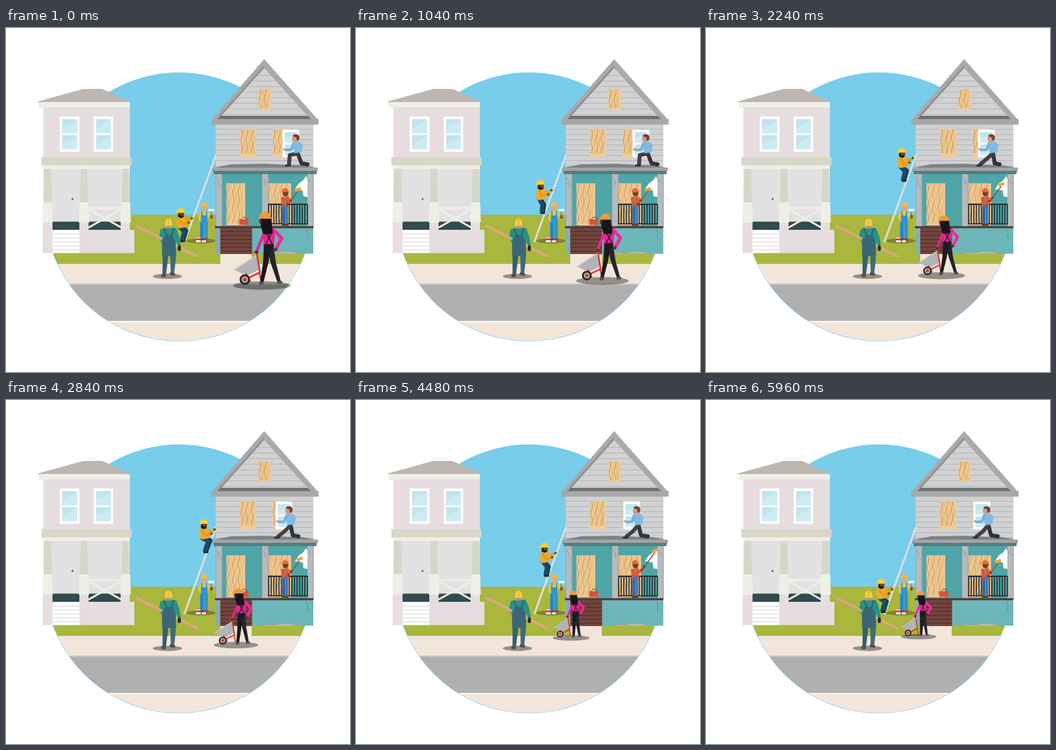
Animation, 525 px wide and 525 px high, one loop 6000 ms. Source, as an HTML page:

```html
<!DOCTYPE html>
<html lang="en">
<head>
<meta charset="utf-8">
<title>House repairs</title>
<style>
html, body { margin: 0; width: 100%; height: 100%; overflow: hidden; background: #fff; }
svg { display: block; width: 100vw; height: 100vh; }
</style>
</head>
<body>
<svg viewBox="0 0 525 525">
  <defs>
    <clipPath id="disc"><circle cx="264" cy="273" r="204.7"/></clipPath>
    <clipPath id="gable"><path d="M394 62L460 134H328Z"/></clipPath>
  </defs>
  <g id="back"></g><g id="moving"></g><g id="front"></g>
</svg>
<script>
const LOOP = 6000, STEP = 40;
const rect = (x, y, w, h, fill) => `<rect x="${x}" y="${y}" width="${w}" height="${h}" fill="${fill}"/>`;
const poly = (points, fill) => `<polygon points="${points}" fill="${fill}"/>`;
const oval = (x, y, rx, ry, fill) => `<ellipse cx="${x}" cy="${y}" rx="${rx}" ry="${ry}" fill="${fill}"/>`;
const shadow = (x, y, rx, ry) => oval(x, y, rx, ry, 'rgba(0,0,0,.38)');
const line = (points, color, w, cap = 'round') =>
  `<polyline points="${points}" fill="none" stroke="${color}" stroke-width="${w}" stroke-linecap="${cap}" stroke-linejoin="round"/>`;
const group = (transform, body) => `<g transform="${transform}">${body}</g>`;
const repeat = (n, draw) => Array.from({ length: n }, (_, i) => draw(i)).join('');
const lerp = (a, b, k) => a + (b - a) * k;
const ramp = (t, from, to) => Math.min(1, Math.max(0, (t - from) / (to - from)));

// Linear interpolation through [time, value] pairs
function track(t, keys) {
  const i = Math.max(1, keys.findIndex(k => k[0] >= t));
  const [a, b] = [keys[i - 1], keys[i]];
  return lerp(a[1], b[1], ramp(t, a[0], b[0]));
}

function helmet(x, y, r, color) {
  return `<path d="M${x - r} ${y}a${r} ${r * 1.05} 0 0 1 ${2 * r} 0z" fill="${color}"/>` +
    rect(x - r - .5, y - 1, 2 * r + 1, 2, color);
}

// Trouser leg that narrows from hip to ankle
function taperedLeg(hipX, hipY, kneeX, kneeY, footX, footY, color) {
  return poly(`${hipX - 5},${hipY} ${hipX + 5},${hipY} ${kneeX + 4},${kneeY} ${footX + 2.7},${footY} ` +
    `${footX - 2.7},${footY} ${kneeX - 4},${kneeY}`, color);
}

function wood(x, y, w, h) {
  const n = Math.floor(w / 3);
  return rect(x, y, w, h, '#f0cb97') + repeat(n, i => {
    const gx = x + 2 + i * (w - 3) / n;
    const pts = repeat(Math.floor(h / 4), j =>
      `${(gx + Math.sin(j * 1.1 + i * 2.3) * 1.1).toFixed(1)},${y + 1 + j * 4} `);
    return line(pts, i % 3 ? '#dfae6c' : '#c98f4b', 0.9);
  });
}

function sashWindow(x, y, w, h) {
  const pw = w - 7, ph = (h - 11) / 2;
  const pane = py => rect(x + 3.5, py, pw, ph, '#bfe5ef') +
    poly(`${x + 3.5},${py + ph} ${x + 3.5},${py + ph * .65} ${x + 3.5 + pw},${py + 2} ${x + 3.5 + pw},${py + ph}`, '#cdebf2');
  return rect(x, y, w, h, '#fff') + pane(y + 4) + pane(y + 7 + ph);
}

function ground() {
  return oval(264, 273, 205.3, 205.3, '#78cdea') + `<g clip-path="url(#disc)">` +
    rect(50, 285, 430, 76, '#a9b73d') +
    rect(50, 360, 430, 30, '#f2e6db') + rect(327, 344, 48, 18, '#f2e6db') +
    rect(50, 390, 430, 2, '#cdc6c0') + rect(50, 392, 430, 56, '#b0b0b0') +
    rect(50, 447, 430, 2, '#fff') + rect(50, 449, 430, 32, '#f2e6db') + '</g>';
}

function leftHouse() {
  const wall = '#e6dddf', trim = '#efefe8', stone = '#d8d7c7';
  const column = x => poly(`${x + 1},215 ${x + 11},215 ${x + 12},266 ${x},266`, stone) +
    poly(`${x - 1},266 ${x + 13},266 ${x + 14},297 ${x - 2},297`, trim);
  return poly('49,112 118,93 147,93 189,112 189,114 49,114', '#beb6b0') +
    rect(50, 113, 139, 9, trim) + rect(57, 121, 132, 77, wall) +
    sashWindow(82, 135, 30, 54) + sashWindow(134, 135, 29.5, 54) +
    rect(57, 210, 132, 98, '#e3e2e2') +
    rect(54, 197, 137.5, 13, stone) + rect(57, 209.5, 132, 6, trim) +
    line('70,216 70,296', '#d9d9d7', 1) + `<circle cx="101.5" cy="261" r="1.7" fill="#777"/>` +
    rect(70, 295.5, 105, 13, '#314b4e') + rect(112, 295, 14, 13, wall) +
    column(57.5) + column(113) + column(176.5) +
    rect(126, 273, 50, 3.5, trim) + line('127,277 175,304', trim, 3) + line('175,277 127,304', trim, 3) +
    rect(56, 297, 15, 46.5, wall) + rect(112, 308, 84, 35.5, wall) +
    rect(71, 308, 41, 35.5, '#fff') + repeat(5, i => rect(71, 314 + i * 6, 41, .8, '#cfcfcf'));
}

function rightHouse() {
  const siding = '#b4b5b7', grey = '#b7babc', teal = '#50a5a7', crack = '#85898c';
  return poly('394,47.5 477,141 313,141', '#a9aaac') + poly('394,57 394,62 328,135 324,135', '#8f9092') +
    poly('394,61 461,135 328,135', '#d1d2d3') +
    `<g clip-path="url(#gable)">${repeat(8, i => rect(325, 72 + i * 8.5, 140, 1, siding))}</g>` +
    poly('328,134 460,134 467,140 321,140', '#6f7072') +
    wood(385.5, 93, 18.5, 32) +
    rect(320, 147, 149, 67, '#d0d1d2') + repeat(8, i => rect(320, 154 + i * 8, 149, 1, siding)) +
    rect(313, 139, 164, 8.5, '#a7a8aa') +
    wood(357.5, 154, 24.5, 43) + wood(407, 154, 25, 43) +
    rect(320, 222, 149, 84, teal) +
    poly('315,215 344,208 395,207 450,210 475,215 475,219 315,219', '#85888c') +
    rect(316, 213, 160, 5, '#a2a4a7') + poly('344,208 450,209 472,213 318,213', '#7d8084') +
    rect(317, 218, 157, 5, '#527e82') +
    wood(336.5, 237, 28.5, 64) + wood(400, 237, 35, 64) +
    poly('458,226 461,233 461,258 454,257 453,248 441,246 447,237 453,233', '#fff') +
    [320.5, 391, 460].map(x => rect(x, 223, 9.5, 81, grey) + rect(x + 8, 223, 1.5, 81, '#a3a7a9')).join('') +
    line('321,229 325,234 323,238 328,243', crack, .8) + line('461,231 465,236 468,237', crack, .8) +
    line('392,229 396,234 395,240', crack, .8) +
    rect(400, 268, 60, 2, '#222a2d') + rect(400, 298, 60, 1.5, '#222a2d') +
    repeat(16, i => rect(400 + i * 3.95, 269, 1.6, 31, '#222a2d')) +
    rect(356, 292, 14, 8.5, '#d6523d') + line('359,292 361,289 367,289 368,292', '#9b3c2f', 1) +
    rect(375, 305, 94, 39.5, '#6cb6b9') + rect(320, 305, 8, 40, '#85afb3') +
    line('458,307 461,314 459,319 464,322', '#5d8f94', 1) +
    poly('392,344.5 398,342 412,343 421,340.5 437,341 447,344.5', '#b4b8ba') +
    line('392,344 398,342 412,343 421,340.5 437,341 446,344', '#8b9093', .8) +
    rect(327, 305, 48.5, 40, '#71443d') + repeat(6, i => rect(327, 310 + i * 6, 48.5, 1.2, '#532f2b')) +
    rect(319, 302.5, 150, 3, '#573331');
}

function windowFitter(t) {
  const x = -14 * ramp(t, 1100, 3420), lead = ramp(t, 1100, 2300), last = ramp(t, 2300, 3420);
  const toe = lerp(428, 414, lead) - 5 * last, heel = lerp(462, 449, lead) - 2 * last;
  const lowKnee = lerp(451, 440, lead) - 5 * last;
  return sashWindow(422 + x, 155, 25.5, 42.5) +
    line(`${445 + x},191 ${lowKnee},206.5 ${heel - 2},208`, '#343436', 6) +
    line(`${444 + x},192 ${lerp(433, 427, lead) - 5 * last},${lerp(194, 201, lead)} ${toe + 4},208`, '#414143', 6) +
    line(`${toe - 1},210 ${toe + 5},210`, '#292a2d', 2.5) +
    line(`${heel - 2},210 ${heel},207`, '#292a2d', 2.5) +
    poly(`${436 + x},175 ${447 + x},173 ${453 + x},178 ${451 + x},190 ${440 + x},191`, '#84b9e3') +
    line(`${438 + x},178 ${435 + x},186 ${427 + x},186`, '#79b0dc', 4) +
    oval(424.5 + x, 185, 2, 1.8, '#d79b70') +
    oval(441 + x, 169, 4.5, 5.5, '#d79b70') +
    `<path d="M${437 + x} 165q3 -5 9 -2q4 3 0 10q-3 -1 -3 -6z" fill="#70452e"/>`;
}

function wallPainter(t) {
  const lift = (1 - Math.cos(t * 2 * Math.PI / 1000)) / 2;
  const hx = lerp(434, 440, lift), hy = lerp(264, 254, lift);
  const rx = lerp(446, 457, lift), ry = lerp(247, 230, lift);
  return line('424,273 424,300', '#2c69aa', 4.5, 'butt') + line('428.5,273 428.5,300', '#3479bd', 4, 'butt') +
    rect(421, 299, 10, 3, '#6c3d29') +
    poly('420,259 430,256 433,262 431,275 421,275', '#e8623b') +
    rect(422, 267, 8, 8, '#3479bd') + line('423,258 424,267', '#3479bd', 1.5) + line('429,258 429,267', '#3479bd', 1.5) +
    line(`430,259 434,262 ${hx},${hy}`, '#e8623b', 4) +
    line(`421,260 424,269 ${hx - 4},${hy + 5}`, '#dd5935', 3.5) +
    line(`${hx - 4},${hy + 6} ${rx - 1},${ry + 3}`, '#8a5438', 1.6) +
    oval(hx, hy, 1.9, 1.9, '#754025') + oval(hx - 4, hy + 5, 1.9, 1.9, '#754025') +
    line(`${rx - 5},${ry + 1} ${rx + 4},${ry - 2}`, '#efa23b', 4.5, 'butt') +
    oval(426.5, 252, 4.5, 5, '#754025') + helmet(426, 249.5, 5, '#e76b35');
}

function climber(t) {
  const x = 259.5 + track(t, [[0, 0], [2440, 35], [3440, 35], [6000, 0]]);
  const y = track(t, [[0, 274], [1040, 231], [2240, 182], [2440, 181], [3440, 181], [3840, 191], [4480, 217], [5440, 251], [6000, 274]]);
  const bend = track(t, [[0, .7], [1040, .2], [2240, .6], [2440, 1], [3440, 1], [4480, .4], [5440, 1], [6000, .7]]);
  const leg = (dx, k, color) => line(`${5 + dx},30 ${9 + dx + 6 * k},${40 - 7 * k} ${9 + dx},49`, color, 6);
  return group(`translate(${x} ${y})`,
    line('12,17 18,20 24,17', '#e69b22', 3.5) +
    leg(2.5, bend, '#123b55') + leg(0, bend * .8, '#1a4b69') +
    line('8,51.5 13,51.5', '#202020', 2.5) +
    poly('2,15 11,13 16,19 15,30 3,32 0,23', '#f3aa2c') +
    line('5,18 9,25 17,24', '#e69b22', 4) + oval(19, 23, 2, 1.8, '#74442b') + oval(24, 16.5, 2, 1.8, '#74442b') +
    oval(8, 10.5, 4.5, 5, '#74442b') + `<path d="M3 9v5q5 4 9 0l-2 -2q-4 1 -5 -3z" fill="#231c1b"/>` +
    helmet(7, 7, 6, '#f6d12d'));
}

function barrowWoman(t) {
  const k = ramp(t, 0, 4750);
  const stride = 2 + 12 * Math.abs(Math.cos((Math.min(t, 4750) - 120) * Math.PI / 1000));
  const left = 13 - stride, right = 13 + stride;
  const red = '#dd3434';
  const barrow = poly('-42,-24 -8,-46 -3,-25 -20,-16 -30,-18', '#b2b4b7') +
    line('-42,-24 -8,-46', '#c9cbcd', 1.5) +
    line('-26,-9 -3,-20 -8,-51 -12,-51', red, 2.6) + line('-24,-18 -18,-7', red, 2.4) + line('-4,-20 -1,-7', red, 2.4) +
    `<circle cx="-26" cy="-9" r="6.5" fill="#b9b9b9" stroke="#25272a" stroke-width="3"/>` + oval(-26, -9, 3, 3, red);
  const body = taperedLeg(13, -58, 13 + stride * .35, -34, right, -6, '#24232a') +
    taperedLeg(8, -58, 9 - stride * .25, -34, left, -5, '#1b1a20') +
    line(`${right - 1},-4.5 ${right + 3},-5`, '#55534f', 4.5) + line(`${left - 2},-3 ${left + 1},-4`, '#55534f', 4.5) +
    line('4,-82 -1,-69 -8,-52', '#e6248e', 4.5) + oval(-8, -51, 2.5, 2.5, '#54301f') +
    poly('1,-86 18,-88 20,-79 18,-57 3,-57', '#e6248e') +
    poly('3,-63 18,-63 18,-56 3,-56', '#1b1a20') + line('5,-84 16,-63', '#1b1a20', 1.6) + line('17,-84 6,-63', '#1b1a20', 1.6) +
    line('18,-85 30,-72 22,-57', '#ed2b98', 5.5) + oval(21, -55, 2.5, 2.5, '#54301f') +
    `<path d="M-3 -104h17q1 12 3 23q-7 5 -15 2q-4 -10 -5 -25z" fill="#17151a"/>` +
    oval(-2, -98, 2, 4, '#54301f') + helmet(5, -103, 9, '#f19a36');
  return group(`translate(${lerp(390.5, 324.5, k)} ${lerp(393, 361.3, k)}) scale(${lerp(1, .62, k)})`,
    shadow(0, 0, 44, 6.5) + barrow + body);
}

function yardPainter() {
  return oval(297.5, 325, 22.5, 3.8, '#7f8338') +
    line('299,296 299,321', '#2386cf', 5.5, 'butt') + line('305.3,296 305.3,321', '#2d94dc', 5.5, 'butt') +
    rect(296, 321, 6, 3, '#794731') + rect(303, 321, 6, 3, '#794731') +
    poly('296,280 308,279 310,290 296,292', '#f2c431') + line('298,282 295,289 297,294', '#f2c431', 3.5) +
    line('307,282 313,288', '#f2c431', 3.5) + rect(297.5, 286, 10, 12, '#2d94dc') +
    line('299,280 299,287', '#2d94dc', 1.8) + line('306,280 306,287', '#2d94dc', 1.8) +
    oval(313.5, 288, 2, 3, '#86372c') + line('313,289 313,281', '#8f6347', 1.2) + rect(309, 276, 9, 3.5, '#f8f5e7') +
    oval(302.5, 274, 4.2, 5, '#e5a67c') + helmet(302.5, 271, 5, '#f4bd2f') +
    rect(290, 320, 7, 7, '#fff') + rect(290, 321, 7, 3, '#df4339') + rect(299, 324, 6, 3, '#eee') + rect(305, 322, 4, 4, '#df4339');
}

function plankCarrier() {
  return shadow(246.5, 379, 22.5, 4) +
    line('238,309 236,320 240,327', '#259287', 5) +
    line('197.5,302 293.5,350', '#dba178', 4, 'butt') + line('198,300.5 294,348.5', '#e5b78e', 1, 'butt') +
    taperedLeg(243.5, 335, 243, 354, 241.5, 376, '#365f70') +
    taperedLeg(254.5, 335, 255, 354, 254, 374, '#3f6b7c') +
    line('239,378 242,378', '#544f4b', 4.5) + line('252,375 256,376', '#544f4b', 4.5) +
    poly('239,306 257,305 261,328 238,329', '#259287') +
    line('258,308 262,319 264,330', '#259287', 5) + oval(264.5, 336, 2.5, 4.5, '#2d292a') +
    poly('243,316 254,316 259,327 259.5,348 238.5,348 238,327', '#3b6677') +
    line('241,306 246,318', '#365f70', 2) + line('256,306 252,318', '#365f70', 2) +
    rect(244, 299, 7.5, 7, '#c98c61') +
    `<path d="M242.5 302v-5q1 -6.5 5.5 -6.5t5.5 6.5v5z" fill="#f4cf42"/>` + line('248,291 248,301', '#d9ae2e', 1);
}

const ladder = line('272,327 320.5,194', '#dfe0e0', 3, 'butt') +
  repeat(22, i => { const k = i / 22; return rect(lerp(271, 318, k), lerp(325, 197, k), 3, 1, '#cccfd1'); });

const [back, moving, front] = ['back', 'moving', 'front'].map(id => document.getElementById(id));
back.innerHTML = ground() + leftHouse() + rightHouse() + ladder + yardPainter();
front.innerHTML = plankCarrier();

function draw(now) {
  const t = Math.floor((now % LOOP) / STEP) * STEP;
  moving.innerHTML = windowFitter(t) + wallPainter(t) + climber(t) + barrowWoman(t);
}

const start = performance.now();
function tick() {
  draw(performance.now() - start);
  requestAnimationFrame(tick);
}
tick();
</script>
</body>
</html>
```
